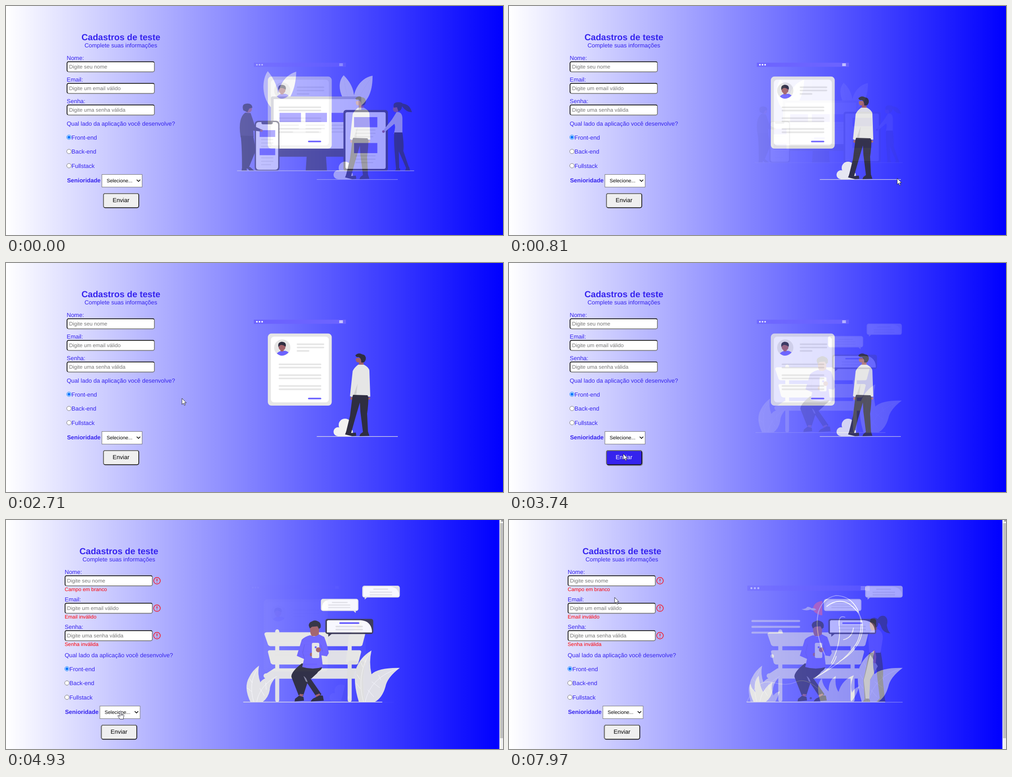
Recreate the animation shown at these times as an HTML page. Size 1101 by 509 pixels, loop 8000 ms.

```html
<!DOCTYPE html>
<html lang="pt-BR">
<head>
<meta charset="utf-8">
<title>Cadastros de teste</title>
<style>
html, body { margin: 0; width: 100%; height: 100%; overflow: hidden; background: #00f; }
svg { display: block; width: 1101px; height: 509px; }
text { font-family: "Liberation Sans", Arial, sans-serif; text-rendering: geometricPrecision; }
#art { isolation: isolate; }
#art > g { mix-blend-mode: plus-lighter; }
</style>
</head>
<body>
<svg id="stage" viewBox="0 0 1101 509"></svg>
<script>
const INK = '#3523ee', DARK = '#2f2e41', SLATE = '#3f3d56', ACCENT = '#6c63ff',
      GREY = '#e6e6e6', SKIN = '#a0616a', WHITE = '#fff';

// Drawing helpers
const rect = (x, y, w, h, c, r = 0) => `<rect x="${x}" y="${y}" width="${w}" height="${h}" rx="${r}" fill="${c}"/>`;
const dot = (x, y, r, c) => `<circle cx="${x}" cy="${y}" r="${r}" fill="${c}"/>`;
const fill = (c, d) => `<path fill="${c}" d="${d}"/>`;
const stroke = (c, w, d) =>
  `<path fill="none" stroke="${c}" stroke-width="${w}" stroke-linecap="round" stroke-linejoin="round" d="${d}"/>`;
const bar = (x1, x2, y, c = GREY, w = 3.6) => stroke(c, w, `M${x1 + w / 2} ${y}H${x2 - w / 2}`);
const bars = (x1, x2, ys, c, w) => ys.map(y => bar(x1, x2, y, c, w)).join('');
const text = (s, x, y, size = 13, c = INK, extra = '') =>
  `<text x="${x}" y="${y}" font-size="${size}" fill="${c}" ${extra}>${s}</text>`;

// Bevelled box: one colour on the top and left edges, another below and right
function bevel(x, y, w, h, r, bg, light, dark, id = '') {
  const k = r * .3;
  return `<rect ${id} x="${x}" y="${y}" width="${w}" height="${h}" rx="${r}" fill="${bg}" stroke="${dark}" stroke-width="1.7"/>` +
    stroke(light, 1.7, `M${x + k} ${y + h - k}A${r} ${r} 0 0 1 ${x} ${y + h - r}V${y + r}A${r} ${r} 0 0 1 ${x + r} ${y}` +
      `H${x + w - r}A${r} ${r} 0 0 1 ${x + w - k} ${y + k}`);
}

function field(i, label, hint, error) {
  const y = 48 * i;
  return `<g class="row">` + text(label, 134.5, 119.5 + y) +
    bevel(135.3, 123.8 + y, 193.4, 22.5, 3.6, WHITE, '#222', '#767676') +
    text(hint, 139.7, 139.2 + y, 11.7, '#757575') +
    `<g class="error">` + text(error, 134.5, 158 + y, 11.4, '#f00') +
    `<circle cx="339" cy="${135 + y}" r="7.3" fill="none" stroke="#f00" stroke-width="1.3"/>` +
    stroke('#f00', 1.5, `M339 ${131 + y}v4.5M339 ${138.8 + y}v.1`) + `</g></g>`;
}

function radio(label, y, on) {
  const c = on ? '#0075ff' : '#767676';
  return `<circle cx="139.5" cy="${y}" r="4.9" fill="#fff" stroke="${c}"/>` +
    (on ? dot(139.5, y, 3.2, c) : '') + text(label, 145, y + 5);
}

const form =
  text('Cadastros de teste', 254.5, 75.8, 19.5, INK, 'font-weight="bold" text-anchor="middle"') +
  text('Complete suas informações', 254.5, 91.8, 13, INK, 'text-anchor="middle"') +
  field(0, 'Nome:', 'Digite seu nome', 'Campo em branco') +
  field(1, 'Email:', 'Digite um email válido', 'Email inválido') +
  field(2, 'Senha:', 'Digite uma senha válida', 'Senha inválida') +
  `<g class="row">` + text('Qual lado da aplicação você desenvolve?', 134.5, 265.8) +
  radio('Front-end', 291.7, true) + radio('Back-end', 323.3) + radio('Fullstack', 355) +
  text('Senioridade', 135.2, 392, 13, INK, 'font-weight="bold"') +
  `<rect x="212.5" y="374.5" width="89" height="28" fill="#fff" stroke="#767676"/>` +
  text('Selecione...', 223, 392.3, 10.9, '#000') + stroke('#000', 1.6, 'M290 386.5l3.5 3.5 3.5-3.5') +
  `<rect id="shadow" x="216.5" y="418" width="80" height="33" rx="5" fill="#777" opacity=".7"/>` +
  bevel(215.8, 416.8, 78.4, 31.5, 4, '#efefef', '#767676', '#111', 'id="button"') +
  text('Enviar', 254.8, 436, 13, '#000', 'id="send" text-anchor="middle"') + `</g>`;

// A long pointed leaf from its base to its tip, with a vein
const leaf = (c, base, tip, left, right) => fill(c, `M${base}C${left} ${tip}C${right} ${base}Z`);

const browser = (x1, x2, y, h, dx) => rect(x1, y, x2 - x1, h, ACCENT) +
  [0, 1, 2].map(i => dot(x1 + dx + i * dx * .85, y + h / 2, h / 5, WHITE)).join('');

const screenCards = [606, 663.5, 721].map(x =>
  rect(x, 237.5, 47.5, 20.5, ACCENT) + bars(x, x + 43, [265, 272.5], GREY, 3) + bar(x, x + 30, 280, GREY, 3)).join('');

const panel = (x, w, tops, h) => tops.map(y => rect(x, y, w, h, ACCENT) +
  bars(x + 3, x + w - 4, [y + h + 6, y + h + 13.5], GREY, 2.4) + bar(x + 3, x + w - 9, y + h + 21, GREY, 2.4)).join('');

const devices =
  leaf('#f2f2f2', '594 232', '580 145', '562 205 568 160', '602 170 612 210') +
  leaf('#f2f2f2', '602 232', '643 146', '596 190 612 155', '642 190 626 215') +
  leaf('#f2f2f2', '765 232', '748 154', '736 200 733 170', '770 175 778 205') +
  leaf('#f2f2f2', '772 232', '812 155', '762 195 782 160', '812 195 800 215') +
  stroke(GREY, .8, 'M580 147Q580 195 594 231M642 148Q615 185 602 231M748 156Q752 195 766 231M811 157Q785 190 772 231') +
  rect(587, 201, 200, 120, '#b8b8c4', 4) + rect(593, 207, 188, 110, WHITE) +
  fill(SLATE, 'M580 317H793V331Q793 335 789 335H584Q580 335 580 331Z') +
  fill(SLATE, 'M666 335H709L711 366H664Z') +
  bars(604, 698, [225, 232]) + screenCards + bar(669, 698, 301, ACCENT) +
  rect(551, 255, 55, 112, SLATE, 8) + rect(554, 258, 49, 106, WHITE, 6) + rect(566, 256, 25, 7, SLATE, 3.5) +
  panel(562, 34.5, [276, 316.5], 15) +
  rect(747.5, 231, 98.5, 136, SLATE, 6) + rect(752, 236, 89, 126, WHITE, 4) +
  panel(771, 51.5, [247, 304.5], 22.5) +
  // man by the phone
  dot(537, 229, 8, SKIN) + fill(DARK, 'M526 232Q521 218 533 217Q545 216 546 226L539 228 535 236Z') +
  fill(SLATE, 'M530 237L542 238Q548 255 552 268L567 275 565 279 548 277 549 291 520 292Q513 250 530 237Z') +
  dot(566, 277, 2.8, SKIN) +
  fill(DARK, 'M520 288L548 289Q553 315 552 325L537 362 531 361 539 323 531 362 523 362Q523 310 520 288Z') +
  fill(DARK, 'M522 366L523 360 533 361 534 366ZM539 366L533 357 541 358 550 366Z') +
  // woman by the tablet
  dot(864, 229, 7, SKIN) + fill(DARK, 'M859 226Q856 215 866 214Q875 213 879 217Q895 219 899 236Q888 237 877 223Q877 232 869 234L866 225Z') +
  fill('#d0cde1', 'M865 236Q879 234 878 254L878 284 859 284Q864 266 860 262L838 281 836 276 855 252Z') + dot(836, 279, 2.8, SKIN) +
  fill(DARK, 'M860 281H878Q882 310 880 322L893 360 887 362 870 323 871 362 864 362Q858 300 860 281Z') +
  fill(DARK, 'M862 366L865 360 873 361 873 366ZM884 366L886 360 893 358 895 366Z') +
  rect(512, 365.5, 392, 1.4, GREY);

const profile =
  browser(549, 753, 126, 9.2, 6.8) + bars(738, 746.5, [128.3, 130.5, 132.7], WHITE, 1.3) +
  rect(580, 156.8, 141.6, 160.2, GREY, 8) + rect(586.8, 163.7, 128.4, 146, WHITE, 7) +
  dot(612, 188, 18, GREY) + dot(611.5, 187, 7.6, SKIN) + rect(608, 190, 7, 9, SKIN) +
  fill(ACCENT, 'M600 201Q605 196 609 196Q612 198 616 195Q622 195 626 199Q612 212 600 201Z') +
  fill(DARK, 'M603.5 187Q601 176 611 175Q622 176 619.5 186Q616 183 611 182Q606 182 603.5 187Z') +
  bars(644, 705, [180.6, 187.8]) + bar(644, 672, 195.4) +
  bars(604, 698.5, [225.2, 232.4, 249.4, 256.5, 273.4, 280.6]) + bar(669, 698.5, 301.2, ACCENT) +
  dot(751, 360, 14, '#f2f2f2') + dot(735.5, 375, 10, '#f2f2f2') + fill('#f2f2f2', 'M735 385Q745 360 768 372L769 385Z') +
  // standing man
  fill(SKIN, 'M779 211Q788 210 792 219L792 229 781 229 782 221Q774 222 775 212Z') +
  fill(DARK, 'M774 205Q781 198 789 203Q798 204 797 214Q795 223 787 221Q787 211 781 209Q775 210 774 205Z') +
  dot(766, 301, 3.2, SKIN) + dot(804, 301, 2.8, SKIN) +
  fill(DARK, 'M768 292L803 292Q803 315 800 335L802 378 791 378 785 330 784 310 774 344 764 380 753 377 762 340Z') +
  fill(DARK, 'M751 381L754 374 763 378 775 377 776 384 767 385ZM783 385L785 380 793 374 802 375 805 384Z') +
  fill(GREY, 'M780 226H793Q804 232 805 239L807 297 802 297 801 294 769 293 767 298 762 296 768 240Q772 232 780 226Z') +
  fill('#cfcfcf', 'M779 268L770 293 776 293Z') +
  rect(688.5, 385, 179.5, 1.2, GREY);

const bubble = (x, y, w, h, c, cut, tail) => rect(x, y, w, h, c, 5) + fill(c, tail) + fill(WHITE, cut);

const bench =
  rect(596, 243, 9, 162, GREY, 4.5) + rect(757, 243, 9, 162, GREY, 4.5) +
  fill(GREY, 'M577 249.5H792Q797 250 796 254L790 277Q789 280.5 785 280.5H586Q582 280.5 580 277L572 254Q572 250 577 249.5Z') +
  fill(GREY, 'M584 289.5H783Q788 290 787 294L781 317Q780 321.5 776 321.5H592Q588 321.5 586 318L580 294Q579 290 584 289.5Z') +
  fill(GREY, 'M594 330H775L792 342Q790 353 782 353H577Q570 352 570 346Q571 341 577 341Z') +
  bubble(789.5, 145.5, 83.5, 26.5, GREY, 'M795 147.5H852Q867 149 871 162V170H792V150Z', 'M795 171V176.5L801 171Z') +
  bars(814, 847, [153.3], GREY, 2.4) + bars(806, 856, [160, 166], GREY, 2.4) +
  bubble(697.5, 175, 83.5, 27, GREY, 'M716 177H779V200H700V192Q702 179 716 177Z', 'M769 201L775 206.5V201Z') +
  bars(722, 757, [183], GREY, 2.4) + bars(714, 763, [188.7, 194.3], GREY, 2.4) +
  bubble(707.5, 219.5, 106.5, 34, SLATE, 'M713 222.5H786Q808 224 811 245V250H711V225Z', 'M714 252V259.5L723 252Z') +
  bar(738.5, 783, 229, ACCENT) + bars(730, 791, [236.6, 243.4]) +
  // seated man
  fill(SKIN, 'M674 238Q682 232 694 237L693 254 691 258 677 258Q672 248 674 238Z') +
  fill(DARK, 'M671 236Q669 228 678 225Q684 221 691 225Q699 228 697 239L693 242 690 236 678 237 673 241Z') +
  fill(DARK, 'M655 319L700 322Q702 331 695 335L671 352 658 392 649 390 655 351 672 349 699 388 688 394 660 352 657 392 648 390 632 349Q631 338 655 319Z') +
  fill(DARK, 'M655 322H702L689 341 676 353 665 351 649 346Z') +
  fill('#8888a0', 'M659 347Q666 351 668 361L664 359Z') +
  fill(SKIN, 'M651 387L659 388 656 394 648 393ZM685 390L694 386 698 392 688 395Z') +
  fill(DARK, 'M639 404L640 398 649 391 659 394 660 402ZM675 404Q677 398 685 395L695 390 702 391 704 402Z') +
  fill(ACCENT, 'M674 256Q684 262 693 254L705 260Q713 281 715 296L711 303 699 301 702 327Q680 334 656 327L660 309 644 302 655 266Q662 259 674 256Z') +
  stroke('#5a52e0', .8, 'M661 277L657 295 661 308M698 278L701 292') +
  dot(677, 299, 4, SKIN) + rect(677.5, 273, 16.5, 34, GREY, 3) + dot(686, 283, 2.4, ACCENT) +
  dot(692, 288.5, 5.5, SKIN) +
  // plants
  fill(GREY, 'M541 405Q525 372 538 350Q545 335 560 324Q556 343 563 361Q570 349 601 346Q584 363 584 378Q581 395 568 405Z') +
  stroke(WHITE, .9, 'M556 332Q536 362 548 404M599 348Q562 368 555 404M540 354L545 362M534 374L543 381M575 362L576 377M562 375L572 391') +
  fill(GREY, 'M782 405Q768 360 776 330Q785 305 810 290Q804 316 810 343Q826 328 873 329Q845 350 841 371Q834 396 817 405Z') +
  stroke(WHITE, .9, 'M806 296Q776 345 792 404M870 330Q808 350 796 404M787 318L791 327M778 344L784 354M777 364L785 375M826 345L831 356M811 360L828 373M802 378L815 393') +
  rect(525, 404.4, 309, 1.4, GREY);

const flame = 'M690 404Q678 366 693 352Q695 370 708 381Q708 355 724 347Q721 370 730 382Q738 355 764 345Q754 369 760 384Q765 373 776 370Q769 392 758 404Z';
const outdoors =
  browser(528, 799, 145.7, 11.6, 9) + bars(779, 791, [148.6, 151.5, 154.4], WHITE, 1.5) +
  bars(537, 645, [224.5, 237.5], GREY, 4.4) + bar(537, 607, 250.4, GREY, 4.4) +
  fill('#ff6584', 'M694 180Q674 182 673 200Q680 210 694 212Z') +
  fill(GREY, 'M648 198Q658 198 661 193Q667 193 670 196Q676 195 681 199Q674 203 668 199Q657 203 648 198Z') +
  stroke(GREY, .9, 'M527 404Q550 352 583 361T636 360T684 374') + dot(583, 302.5, 4, GREY) + dot(668.5, 396, 2.5, SLATE) +
  stroke(WHITE, 1.7, 'M675 352Q750 312 772 270Q788 232 772 199Q756 168 724 168Q694 174 685 206Q676 250 700 300') +
  stroke(WHITE, 1.7, 'M704 192Q728 173 753 186Q789 212 782 250Q775 288 733 314M714 318Q735 276 732 239Q728 210 744 216M741 266Q760 262 763 240M675 352Q718 330 725 303') +
  fill(GREY, 'M535 404Q527 371 535 364Q538 376 546 383Q541 360 553 346Q556 371 563 382Q574 365 584 360Q579 375 586 390Q590 383 600 381Q594 397 590 404Z') +
  fill(GREY, flame) +
  // woman with ponytail
  fill(SKIN, 'M800 225Q812 222 815 237L817 249 805 252 803 245Q797 237 800 225Z') +
  fill(DARK, 'M800 227Q799 217 810 217L817 220Q823 210 833 214Q841 220 837 234Q839 247 845 252Q828 251 824 236Q820 227 818 229Q818 238 812 239Q811 228 800 227Z') +
  fill(DARK, 'M799 290L823 290Q831 332 828 353L833 402 822 402 816 351 814 330 799 358 798 401 788 401 785 356Z') +
  fill('#a0a0a8', 'M800 299L786 356 790 397 798 397 800 355 817 325Z') +
  fill(ACCENT, 'M803 246L818 243Q829 249 828 264L823 295 798 295 796 265Q795 252 803 246Z') +
  stroke(SKIN, 5, 'M807 281L811 304 810 316') + fill(ACCENT, 'M802 255Q811 252 813 264L812 290 805 290Z') +
  fill(DARK, 'M784 404L788 398 799 399 800 404ZM814 404L821 397 833 399 834 404Z') +
  rect(527, 404.4, 345, 1.2, GREY);

const stage = document.getElementById('stage');
stage.innerHTML = `<defs><linearGradient id="sky"><stop stop-color="#fff"/><stop offset="1" stop-color="#00f"/></linearGradient></defs>
  <rect id="back" width="1101" height="509" fill="url(#sky)"/>
  <g id="art">${[devices, profile, bench, outdoors].map(s => `<g>${s}</g>`).join('')}</g>
  <g id="form">${form}</g>
  <g id="scroll">${rect(1093, 0, 8, 509, '#f1f1f1') + rect(1094.3, 7, 7, 478, '#c1c1c1') + fill('#777', 'M1096 3L1099 0 1101 2V3Z')}</g>
  <g id="cursor" stroke="#1a1a2a" stroke-width=".9" stroke-linejoin="round" fill="#fff">
    <path id="arrow" d="M0 0V13.6L3.2 10.7 5.3 15.5 7.4 14.6 5.3 9.9H9.6Z"/>
    <path id="hand" d="M-1.6 1C-1.6-1 1.4-1 1.4 1V6.5L6 7.6Q7.4 8.2 7.3 10L6.2 14.6V17.5H-1.8L-5.8 11Q-6.6 9 -4.8 9.2L-1.6 11.4ZM1.4 6.5V10M4 7.2V10.2"/>
  </g>`;

const $ = id => document.getElementById(id);
const all = s => [...document.querySelectorAll(s)];
const put = (el, attrs) => { for (const k in attrs) el.setAttribute(k, attrs[k]); };
const show = (el, on) => { el.style.display = on ? '' : 'none'; };
const scenes = [...$('art').children], rows = all('.row'), errors = all('.error');

const LOOP = 8000, PERIOD = 4000, FADE = 2000, LEAD = 560;
const SUBMIT = 4930, HOVER = 3480;
const widths = [459, 319, 348, 344];
const centres = [[708.5, 256], [708.5, 256], [699.5, 275.5], [699.5, 275.5]];
const path = [[620, 924, 430], [800, 860, 383], [1600, 860, 383], [1880, 720, 276], [2140, 720, 276],
  [2280, 466, 327], [2640, 466, 327], [2710, 390, 301], [2790, 376, 289], [3120, 376, 289],
  [3500, 253, 424], [4700, 253, 424], [4900, 254, 425], [6130, 254, 425], [6360, 311, 348],
  [6940, 311, 348], [7320, 227, 198], [7440, 227, 198], [7640, 240, 145], [7880, 234, 172]];

// CSS "ease": cubic-bezier(.25, .1, .25, 1)
function ease(x) {
  let lo = 0, hi = 1, m;
  for (let i = 0; i < 24; i++) {
    m = (lo + hi) / 2;
    if (.75 * m * (1 - m) + m ** 3 < x) lo = m; else hi = m;
  }
  return .3 * m * (1 - m) ** 2 + 3 * m * m * (1 - m) + m ** 3;
}

function pointer(t) {
  const i = path.findIndex(k => k[0] > t);
  if (i < 0) return path.at(-1).slice(1);
  const [t0, x0, y0] = path[Math.max(0, i - 1)], [t1, x1, y1] = path[i];
  const u = t1 > t0 ? (t - t0) / (t1 - t0) : 0;
  return [x0 + (x1 - x0) * u, y0 + (y1 - y0) * u];
}

function draw(t) {
  const failed = t >= SUBMIT, hover = t >= HOVER && !failed;

  // Cross-fade; the frame's width moves from one picture's to the next
  const k = Math.floor((t + LEAD) / PERIOD);
  const u = ((t + LEAD) % PERIOD) / FADE;
  const p = u < 1 ? ease(u) : 1;
  const w = widths[k] + (widths[k + 1] - widths[k]) * p;
  const [cx, cy] = centres[failed ? 2 : 0];
  scenes.forEach((g, i) => {
    const alpha = i === k ? 1 - p : i === k + 1 ? p : 0;
    const s = Math.min(1, w / widths[i]) * (i ? 1 : 1.17);
    show(g, alpha > 0);
    g.style.opacity = alpha;
    put(g, { transform: `translate(${cx} ${cy}) scale(${s}) translate(${-centres[i][0]} ${-centres[i][1]})` });
  });

  put($('back'), { width: failed ? 1093 : 1101 });
  put($('form'), { transform: `translate(${failed ? -4.5 : 0} 0)` });
  rows.forEach((g, i) => put(g, { transform: `translate(0 ${failed ? 13 * i : 0})` }));
  errors.forEach(g => show(g, failed));
  show($('scroll'), failed);
  show($('shadow'), hover);
  put($('button'), { fill: hover ? INK : '#efefef' });
  put($('send'), { fill: hover ? WHITE : '#000' });

  const hand = failed && t < 6190;
  show($('cursor'), t >= path[0][0]);
  show($('arrow'), !hand);
  show($('hand'), hand);
  put($('cursor'), { transform: `translate(${pointer(t).join(' ')})` });
}

const start = performance.now();
function tick() {
  draw((performance.now() - start) % LOOP);
  requestAnimationFrame(tick);
}
tick();
</script>
</body>
</html>
```
